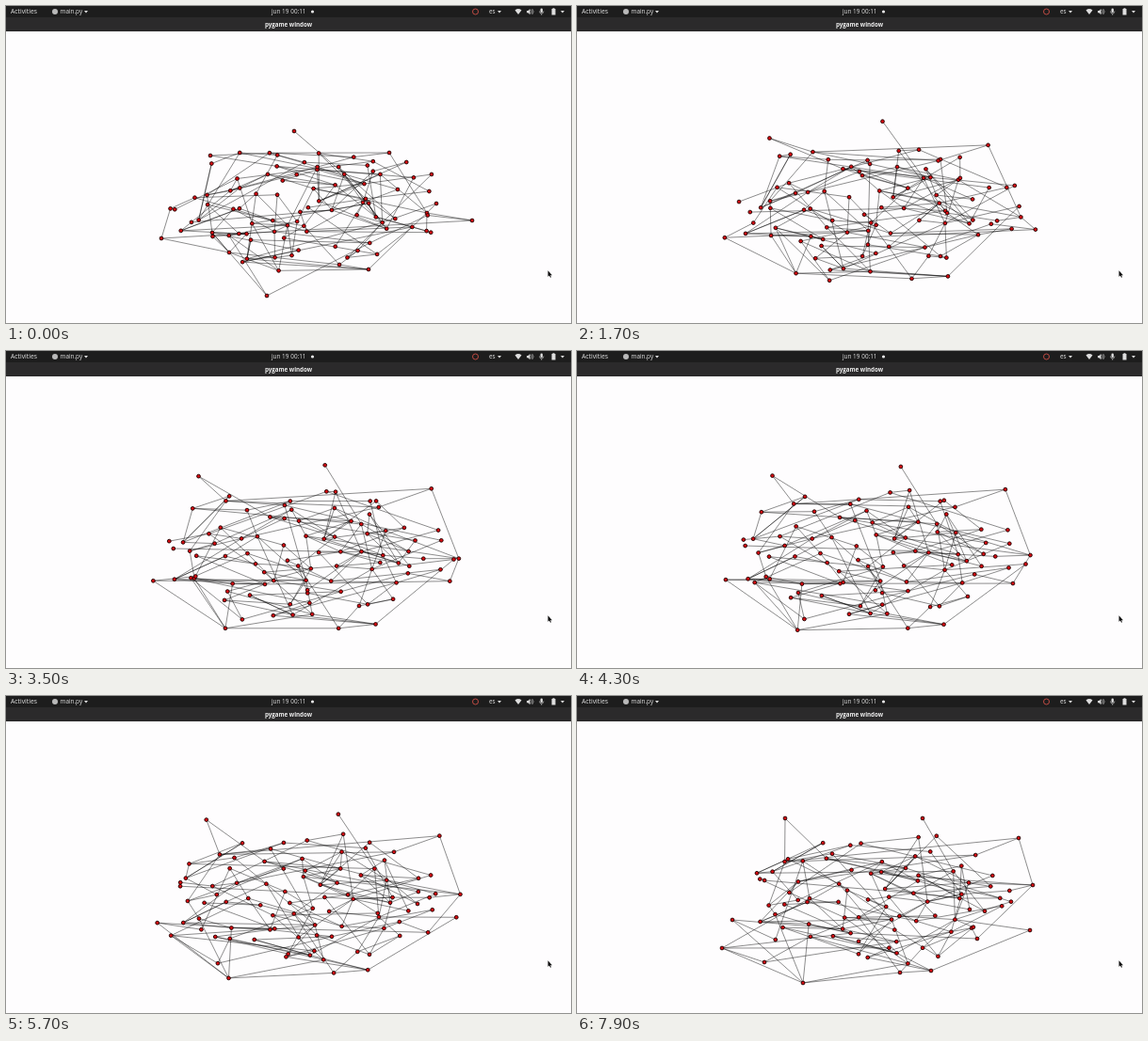
These frames come from a looping animation (600x337 px, 8 s). An HTML page with a canvas:

```html
<!DOCTYPE html>
<html lang="en">
<head>
<meta charset="utf-8">
<title>pygame window</title>
<style>
  html, body { margin: 0; width: 100%; height: 100%; overflow: hidden; background: #fefdfe; }
  canvas, svg { position: absolute; left: 0; top: 0; width: 600px; height: 337px; }
  text { font: 6.35px "Open Sans", "Noto Sans", sans-serif; fill: #e2e2e2; }
  .menu { font-size: 6.8px; }
  .title { font-weight: 700; font-size: 6.2px; fill: #f0f0f0; }
  .thin { fill: none; stroke: #dedede; stroke-width: .6; }
</style>
</head>
<body>
<canvas id="graph"></canvas>
<svg viewBox="0 0 600 337">
  <rect width="600" height="12" fill="#1d1d1d"/>
  <rect y="12" width="600" height="15" fill="#2b2a2b"/>
  <text class="menu" x="5" y="8.4">Activities</text>
  <circle cx="52" cy="6" r="3" fill="#b9b9b9"/>
  <text x="57.5" y="8.4">main.py</text>
  <text x="282" y="8.4">jun 19</text>
  <text x="302.300" y="8.4">00:11</text>
  <circle cx="325.5" cy="6" r="1.6" fill="#e8e8e8"/>
  <text class="title" x="300" y="22.3" text-anchor="middle">pygame window</text>
  <circle cx="498.5" cy="6" r="3" fill="none" stroke="#bd4a43"/>
  <text x="513" y="8.4">es</text>
  <g fill="#dedede">
    <path d="M83 5h4l-2 2.500zM522 5h4l-2 2.500zM589 5h4l-2 2.500z"/>
    <path d="M540.500 4.400q3.500 -2.800 7 0l-3.500 4.600z"/>
    <path d="M553 5h1.500l2 -2v6.200l-2 -2h-1.500z"/>
    <path class="thin" d="M557.500 4q2 2 0 4M558.700 3q3 3 0 6"/>
    <rect x="567.500" y="2.500" width="2.400" height="4.500" rx="1.200"/>
    <path class="thin" d="M566.500 5.500q0 2.500 2.200 2.500t2.200 -2.500M568.700 8v1.700"/>
    <path d="M579.500 3h1v-.8h2V3h1v6.500h-4z"/>
  </g>
  <path d="M575.500 281.300v6.500l1.500 -1.300 1 2.300 1 -.5 -1 -2.100h2z" fill="#111"/>
</svg>
<script>
const LOOP = 8000, SETTLE = 2.3, END = 7.9, INNER = 82;

// Outermost nodes: place at the start, when settled and at the end.
const rim = [
  [306,133, 331,119, 367,130], [217,159, 200,134, 221,130],
  [407,156, 447,145, 469,151], [447,220, 480,226, 484,201],
  [457,210, 474,214, 481,249], [495,228, 484,241, 425,258],
  [219,241, 208,234, 154,268], [165,247, 154,246, 165,238],
  [277,308, 265,286, 199,283], [237,262, 231,292, 240,305],
  [354,275, 356,295, 343,294], [385,280, 397,290, 376,292]
];

let seed = 19;
const rand = () => (seed = (seed * 16807) % 2147483647) / 2147483647;
const lerp = (a, b, k) => a + (b - a) * k;

// The rest fill an ellipse along a golden-angle spiral.
const inner = Array.from({ length: INNER }, (_, i) => ({
  angle: i * 2.39996 + rand() * 0.5,
  radius: Math.sqrt((i + rand()) / INNER),
  spin: rand() * 2 - 1,
  phase: rand() * 6.28
}));

function place(t) {
  const settled = t >= SETTLE, k = settled ? 2 : 0;
  const u = settled ? (t - SETTLE) / (END - SETTLE) : t / SETTLE;
  const early = Math.max(0, SETTLE - t);
  const turn = (t - 5) * 0.07 - early * 0.08;
  const outer = rim.map(p => [lerp(p[k], p[k + 2], u), lerp(p[k + 1], p[k + 3], u)]);
  return outer.concat(inner.map(n => {
    const a = n.angle + n.spin * turn;
    const r = n.radius + 0.06 * Math.sin(n.phase + t * 0.6);
    return [318 + 148 * r * Math.cos(a), 214 + (71 - early * 2) * r * Math.sin(a)];
  }));
}

// Hull links, then each node joins the nearest of a few random ones.
const edges = [[2, 3], [6, 9], [6, 8], [9, 10], [10, 11], [11, 4]];
const rest = place(5);
function link(i) {
  let best, low = Infinity;
  for (let n = 0; n < 5; n++) {
    const j = Math.floor(rand() * rest.length);
    const gap = Math.hypot(rest[i][0] - rest[j][0], 1.8 * (rest[i][1] - rest[j][1]));
    if (gap > 30 && gap < low) { low = gap; best = j; }
  }
  if (best !== undefined) edges.push([i, best]);
}
rest.forEach((_, i) => {
  link(i);
  if (i % 4) link(i);
});

const canvas = document.getElementById("graph");
const ctx = canvas.getContext("2d");
const dpr = window.devicePixelRatio || 1;
canvas.width = 600 * dpr;
canvas.height = 337 * dpr;
ctx.scale(dpr, dpr);

function draw(t) {
  const nodes = place(t);
  ctx.clearRect(0, 0, 600, 337);
  ctx.beginPath();
  for (const [a, b] of edges) {
    ctx.moveTo(...nodes[a]);
    ctx.lineTo(...nodes[b]);
  }
  ctx.strokeStyle = "#000";
  ctx.lineWidth = 0.45;
  ctx.stroke();
  ctx.fillStyle = "#d90d12";
  ctx.strokeStyle = "#1c0000";
  ctx.lineWidth = 0.9;
  for (const [x, y] of nodes) {
    ctx.beginPath();
    ctx.arc(x, y, 1.9, 0, Math.PI * 2);
    ctx.fill();
    ctx.stroke();
  }
}

let start = null;
function tick(now) {
  if (start === null) start = now;
  let step = Math.floor(((now - start) % LOOP) / 100);
  if (step === 51 || step === 58) step--; // two short holds
  draw(step / 10);
  requestAnimationFrame(tick);
}
draw(0);
requestAnimationFrame(tick);
</script>
</body>
</html>
```
